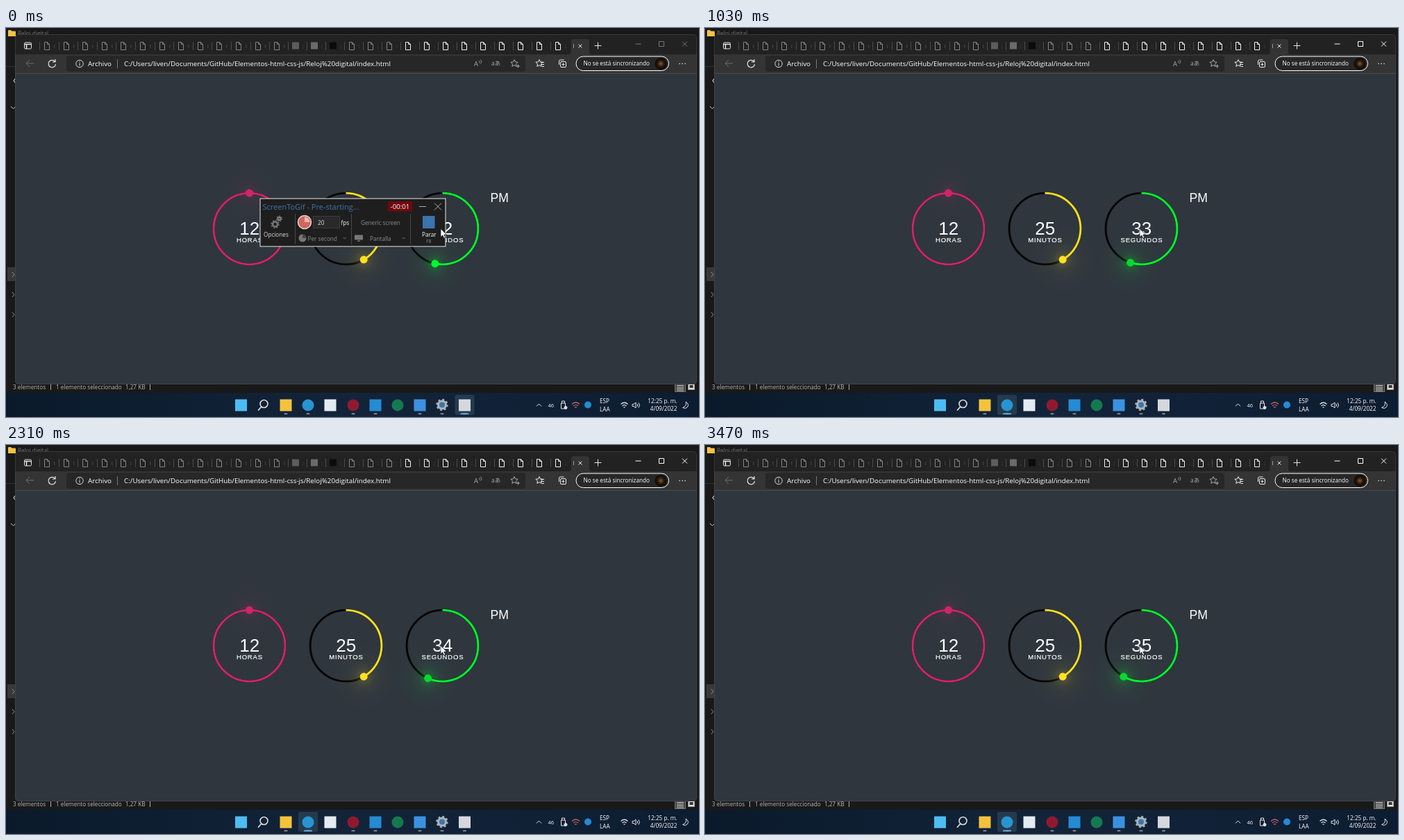
An HTML page that plays this animation: 998x561 px, repeating every 3520 ms.

```html
<!DOCTYPE html>
<html lang="es">
<head>
<meta charset="utf-8">
<title>Reloj digital</title>
<style>
html, body { margin: 0; width: 100%; height: 100%; overflow: hidden; background: #191919; }
svg { display: block; width: 100vw; height: 100vh; }
text { font-family: "Open Sans", "Noto Sans", sans-serif; white-space: pre; }
.clock text { font-family: "Liberation Sans", Arial, sans-serif; fill: #fff; }
.line { fill: none; stroke: #e6e6e6; stroke-width: 1; }
.ui { font-size: 8.2px; }
</style>
</head>
<body>
<svg viewBox="0 0 998 561" preserveAspectRatio="none" xmlns="http://www.w3.org/2000/svg">
  <defs>
    <linearGradient id="bar">
      <stop offset="0" stop-color="#0a1a2b"/><stop offset=".5" stop-color="#13243a"/><stop offset="1" stop-color="#0d1d31"/>
    </linearGradient>
    <radialGradient id="face">
      <stop offset="0" stop-color="#8a5a24"/><stop offset=".5" stop-color="#2c1a0e"/><stop offset="1" stop-color="#090706"/>
    </radialGradient>
  </defs>

  <!-- window behind -->
  <rect width="998" height="561" fill="#191919"/>
  <path d="M3 4q0-1 1-1h3l1.500 1.500H13q1 0 1 1V12H3z" fill="#f5c242"/>
  <text x="17" y="11" font-size="8.200" fill="#777">Reloj digital</text>
  <path d="M0 55.500H13" stroke="#333"/>
  <rect x="2" y="345" width="14" height="20" fill="#383838"/>
  <g class="line" style="stroke:#909090">
    <path d="M14 72l-3 4 3 4" style="stroke:#fff"/>
    <path d="M7 113l3.500 3.500 3.500-3.500" style="stroke:#ccc"/>
    <path d="M9 352l3 3.500-3 3.500M9 381l3 3.500-3 3.500M9 410l3 3.500-3 3.500"/>
  </g>
  <g class="ui" fill="#b8b8b8">
    <text x="10" y="521">3 elementos</text>
    <text x="72" y="521">1 elemento seleccionado</text>
    <text x="172" y="521">1,27 KB</text>
  </g>
  <path d="M64.500 514V522M207.500 514V522" stroke="#aaa"/>
  <rect x="963.500" y="512.500" width="15" height="12" fill="#444" stroke="#777"/>
  <path d="M966 515.500h10M966 518h10M966 520.500h10M966 523h10" stroke="#ddd" stroke-width=".9"/>
  <rect x="982.500" y="513.500" width="9" height="8" fill="#ddd" stroke="#999"/>
  <rect x="984.500" y="515" width="5" height="4" fill="#333"/>

  <!-- browser -->
  <path d="M13 514V15q0-6 6-6H989q6 0 6 6V508q0 6-6 6H19q-6 0-6-6z" fill="#222"/>
  <path d="M13 38H810q4 0 4-4V20q0-4 4-4h18q4 0 4 4v14q0 4 4 4H995V66H13z" fill="#343434"/>
  <path d="M13 66H995V508q0 6-6 6H19q-6 0-6-6z" fill="#2f363e"/>
  <path d="M13 65.500H995" stroke="#4d4d4d"/>
  <path d="M13.500 508V15q0-5.500 5.500-5.500H989q5.500 0 5.500 5.500V508q0 5.500-5.500 5.500H19q-5.500 0-5.500-5.500z" fill="none" stroke="#555" stroke-opacity=".45"/>
  <g id="tabs"></g>
  <g class="line">
    <rect x="26.500" y="21" width="10" height="9" rx="1.500"/>
    <path d="M26.500 23.500h10M29.500 23.500v6.500" stroke-width="1.500"/>
    <path d="M824.500 23.500l5 5m0-5l-5 5M847.500 25.500h10M852.500 20.500v10"/>
    <path d="M817.500 23v6" style="stroke:#999"/>
    <path id="buttons" d="M906.500 23h8M940.500 19.500h7v7h-7zM974 19.500l7 7m0-7l-7 7"/>
    <path d="M29 51h11M34 46l-5 5 5 5" style="stroke:#6f6f6f"/>
    <path d="M70.500 48.500a5.200 5.200 0 1 0 1 3.500M71 45v4h-4" stroke-width="1.200"/>
  </g>
  <rect x="87" y="40" width="661" height="23" rx="4" fill="#272727"/>
  <g class="line" style="stroke:#ddd">
    <circle cx="106" cy="51.500" r="5.200"/>
    <path d="M106 50.500v4M106 48v1.200"/>
    <path d="M160.500 45v13" style="stroke:#777"/>
  </g>
  <g font-size="9.800" fill="#fff">
    <text x="118" y="54.500">Archivo</text>
    <text x="170" y="54.500">C:/Users/liven/Documents/GitHub/Elementos-html-css-js/Reloj%20digital/index.html</text>
  </g>
  <g fill="#aaa" font-size="9.500">
    <text x="674" y="55">A</text>
    <text x="699" y="54" font-size="8.500">aあ</text>
  </g>
  <g class="line" style="stroke:#aaa">
    <path d="M681.500 47q1.500 1.500 0 3.500M683.500 45.500q3 3 0 6" stroke-width=".8"/>
    <path id="star1"/>
    <path d="M735 55h5M737.500 52.500v5"/>
    <path id="star2" style="stroke:#eee"/>
    <path d="M770 49.500h5M771 52.500h4M772 55.500h3" style="stroke:#eee"/>
    <rect x="798.500" y="48.500" width="8" height="8" rx="1.500" style="stroke:#eee"/>
    <path d="M796.500 53v-5q0-2 2-2h5M802.500 50.500v4M800.500 52.500h4" style="stroke:#eee"/>
    <rect x="821" y="41" width="133.500" height="20.500" rx="10.250" style="stroke:#fff;fill:#272727"/>
  </g>
  <text class="ui" x="831.500" y="54" fill="#fff">No se está sincronizando</text>
  <circle cx="943" cy="51.500" r="8.500" fill="url(#face)"/>
  <path d="M970 51.500h.01M974 51.500h.01M978 51.500h.01" stroke="#eee" stroke-width="1.600" stroke-linecap="round"/>

  <!-- clock -->
  <g class="clock" id="clock"><text x="697.500" y="250.500" font-size="17.600">PM</text></g>

  <!-- taskbar -->
  <rect y="526" width="998" height="35" fill="url(#bar)"/>
  <rect id="active" y="529" width="28" height="29" rx="3" fill="#263a4e"/>
  <g id="apps"></g>
  <circle class="line" cx="371.500" cy="542" r="5.500" style="stroke:#ddd;stroke-width:1.600"/>
  <path d="M367.500 546.500l-4 4.500" stroke="#ddd" stroke-width="1.800" stroke-linecap="round"/>
  <circle cx="628" cy="543.500" r="5.500" fill="#3978ad" stroke="#aeb5bb" stroke-width="3"/>
  <circle cx="628" cy="543.500" r="7.700" fill="none" stroke="#aeb5bb" stroke-width="2" stroke-dasharray="3 3.047"/>
  <g class="ui" fill="#fff">
    <text x="780.500" y="546.500" style="font-size:7.500px">46</text>
    <text x="855" y="541">ESP</text><text x="855" y="553">LAA</text>
    <text x="966.500" y="541" text-anchor="end">12:25 p. m.</text>
    <text x="966.500" y="552" text-anchor="end">4/09/2022</text>
  </g>
  <g class="line">
    <path d="M764 545.500l3.500-3.500 3.500 3.500"/>
    <path d="M799.500 541h6v8h-6zM800.500 541v-3h4v3"/>
    <circle cx="806" cy="547.500" r="2" style="fill:#ddd"/>
    <path d="M815 542.500q5.500-5 11 0M817 545q3.500-3 7 0M819 547.300q1.500-1.300 3 0" style="stroke:#d5655e" stroke-width="1.200"/>
    <path d="M885.500 542.500q5-4.500 10 0M887.500 545q3-2.700 6 0M889.500 547.300q1-1 2 0" stroke-width="1.200"/>
    <path d="M902 542.500h2l3-2.500v8l-3-2.500h-2zM909 542q1.500 2 0 4M911 540.500q3 3.500 0 7"/>
    <path d="M979 539q2 6-4.500 8.500 4 2.500 7-1 2.500-4-2.500-7.500z"/>
  </g>
  <circle cx="838" cy="543.500" r="5" fill="#2689d6"/>

  <!-- recorder -->
  <g id="panel">
    <rect x="366" y="246" width="267" height="69" fill="#1e1e1e" stroke="#e8e8e8"/>
    <text x="369.500" y="262" font-size="11" fill="#3f76b0">ScreenToGif - Pre-starting...</text>
    <rect x="550" y="250" width="35" height="14.500" fill="#6f080f"/>
    <text x="567.500" y="261" font-size="9.700" fill="#fff" text-anchor="middle">-00:01</text>
    <path class="line" d="M595 257.500h10M617 252.500l10 10m0-10l-10 10" style="stroke:#aaa"/>
    <path d="M416.500 268v44M497.500 268v44M582.500 268v44" stroke="#484848"/>
    <g fill="none" stroke="#777" stroke-width="2.500">
      <circle cx="387.500" cy="283" r="3.500"/><circle cx="393.500" cy="275" r="2"/>
      <g stroke-width="1.500"><circle cx="387.500" cy="283" r="5.400" stroke-dasharray="2.120 2.120"/><circle cx="393.500" cy="275" r="3.700" stroke-dasharray="1.660 1.660"/></g>
    </g>
    <circle cx="430" cy="280" r="9.500" fill="#d0665e" stroke="#e5d8d6" stroke-width="1.500"/>
    <path d="M430 280V272.500A7.500 7.500 0 0 1 437.500 280z" fill="#efb5ae"/>
    <rect x="442.500" y="271.500" width="38" height="17" fill="#292929" stroke="#3c3c3c"/>
    <circle cx="427" cy="303" r="5.500" fill="#777"/><path d="M427 303v-5.500a5.500 5.500 0 0 1 5.500 5.500z" fill="#444"/>
    <path d="M484.500 302h6l-3 3zM569.500 302h6l-3 3z" fill="#444"/>
    <path d="M502 298.500h12v7h-12zM506 306.500h4v1.500h-4z" fill="#777"/>
    <rect x="600" y="271" width="17.500" height="18" fill="#3b73ae"/>
    <g class="ui" fill="#8d8d8d">
      <text x="371" y="301" fill="#ddd">Opciones</text>
      <text x="449" y="283.500" fill="#ddd">20</text>
      <text x="482.500" y="283.500" fill="#fff">fps</text>
      <text x="434.500" y="306.500">Per second</text>
      <text x="511" y="283.500">Generic screen</text>
      <text x="524" y="306.500">Pantalla</text>
      <text x="599" y="301" fill="#fff">Parar</text>
      <text x="605" y="310" style="font-size:6.800px">F8</text>
    </g>
  </g>
  <path d="M626 289.500v12l2.800-2.600 1.900 4.300 2-.9-1.900-4.200h3.800z" fill="#fff" stroke="#111" stroke-width=".7"/>
</svg>
<script>
const LOOP = 3520, PANEL_END = 50, TICKS = [620, 1630, 2620];
const $ = id => document.getElementById(id);

function add(parent, tag, attrs, text) {
  const el = document.createElementNS('http://www.w3.org/2000/svg', tag);
  for (const k in attrs) el.setAttribute(k, attrs[k]);
  if (text) el.textContent = text;
  parent.appendChild(el);
  return el;
}

function star(id, cx, cy) {
  const pts = Array.from({length: 10}, (_, i) => {
    const r = i % 2 ? 2.6 : 5.4, a = i * Math.PI / 5;
    return (cx + r * Math.sin(a)).toFixed(2) + ' ' + (cy - r * Math.cos(a)).toFixed(2);
  });
  $(id).setAttribute('d', 'M' + pts.join('L') + 'Z');
}
star('star1', 732, 51);
star('star2', 768, 51);

// Tab strip: page icons, with plain squares for site marks
const marks = {13: '#5c5c5c', 14: '#6a6a6a', 15: '#0b0b0b'};
for (let i = 0; i < 28; i++) {
  const x = Math.round(i < 13 ? 59 + i * 27.6 : 417 + (i - 13) * 27);
  const tone = i < 19 ? '#858585' : '#f2f2f2', g = $('tabs');
  add(g, 'path', {d: `M${x - 10.5} 20v12`, stroke: '#4c4c4c'});
  if (marks[i]) add(g, 'rect', {x: x - 5, y: 20.5, width: 10, height: 10, fill: marks[i]});
  else add(g, 'path', {
    d: `M${x - 3.5} 20.5h4l3 3v8h-7zM${x + .5} 20.5v3h3`,
    fill: 'none', stroke: tone, 'stroke-width': 1
  });
  add(g, 'text', {x: x + 10, y: 29, 'font-size': 7, fill: '#666'}, i < 13 ? 'l' : ':');
}

// Taskbar: [centre, colour, round, underlined]
[
  [338.5, '#4cbcf2'], [403, '#f4c33d', 0, 1], [435, '#2795d2', 1, 1], [467, '#e4ebf2'],
  [500, '#8f1a30', 1, 1], [532, '#258bd3', 0, 1], [564, '#137a50', 1, 0],
  [596, '#3b91e0', 0, 1], [628, '', 0, 1], [660.5, '#d5d9dd', 0, 1]
].forEach(([x, fill, round, under]) => {
  const g = $('apps');
  if (fill) add(g, 'rect', {x: x - 8.5, y: 535.5, width: 17, height: 17, rx: round ? 8.5 : 0, fill});
  if (under) add(g, 'rect', {x: x - 2.5, y: 555.5, width: 5, height: 1.8, rx: .9, fill: '#8d969f'});
});
const underline = add($('apps'), 'rect', {y: 555.5, width: 12, height: 1.8, rx: .9, fill: '#62b6e8'});

function makeDial(cx, color, label, glow) {
  const g = $('clock'), cy = 289.5, r = 51.4, id = 'glow' + cx;
  const grad = add(g, 'radialGradient', {id});
  [[0, 1], [.15, .8], [.3, .36], [.5, .13], [1, 0]].forEach(([offset, k]) =>
    add(grad, 'stop', {offset, 'stop-color': color, 'stop-opacity': k * glow}));
  const ring = {cx, cy, r, fill: 'none', 'stroke-width': 2.9};
  add(g, 'circle', {...ring, stroke: '#050505'});
  const arc = add(g, 'circle', {...ring, stroke: color, pathLength: 60, transform: `rotate(-90 ${cx} ${cy})`});
  const dot = add(g, 'g', {});
  add(dot, 'circle', {cx, cy: cy - r, r: 48, fill: `url(#${id})`});
  const ball = add(dot, 'circle', {cx, cy: cy - r, r: 5.5, fill: color});
  const num = add(g, 'text', {x: cx + .2, y: 297.5, 'font-size': 26, 'text-anchor': 'middle'});
  add(g, 'text', {
    x: cx + .4, y: 308.5, 'font-size': 9.5, 'letter-spacing': .8, 'text-anchor': 'middle',
    stroke: '#fff', 'stroke-width': .2
  }, label);
  return (value, max, tone = color) => {
    const part = value / max;
    arc.setAttribute('stroke-dasharray', part < 1 ? `${part * 60} 60` : 'none');
    dot.setAttribute('transform', `rotate(${part * 360} ${cx} ${cy})`);
    ball.setAttribute('fill', tone);
    num.textContent = value;
  };
}
makeDial(350.5, '#d4246a', 'HORAS', .13)(12, 12);
makeDial(489.5, '#fbe022', 'MINUTOS', .17)(25, 60);
const seconds = makeDial(628.5, '#00fb2c', 'SEGUNDOS', .22);

function draw(t) {
  const recording = t >= PANEL_END;
  const s = 32 + TICKS.filter(x => t >= x).length;
  seconds(s, 60, s > 32 ? '#05da2c' : undefined);
  $('panel').style.display = recording ? 'none' : '';
  $('buttons').style.stroke = recording ? '#fff' : '#777';
  $('active').setAttribute('x', recording ? 421 : 646.5);
  underline.setAttribute('x', recording ? 429 : 654.5);
}

function frame() {
  draw(performance.now() % LOOP);
  requestAnimationFrame(frame);
}
frame();
</script>
</body>
</html>
```
